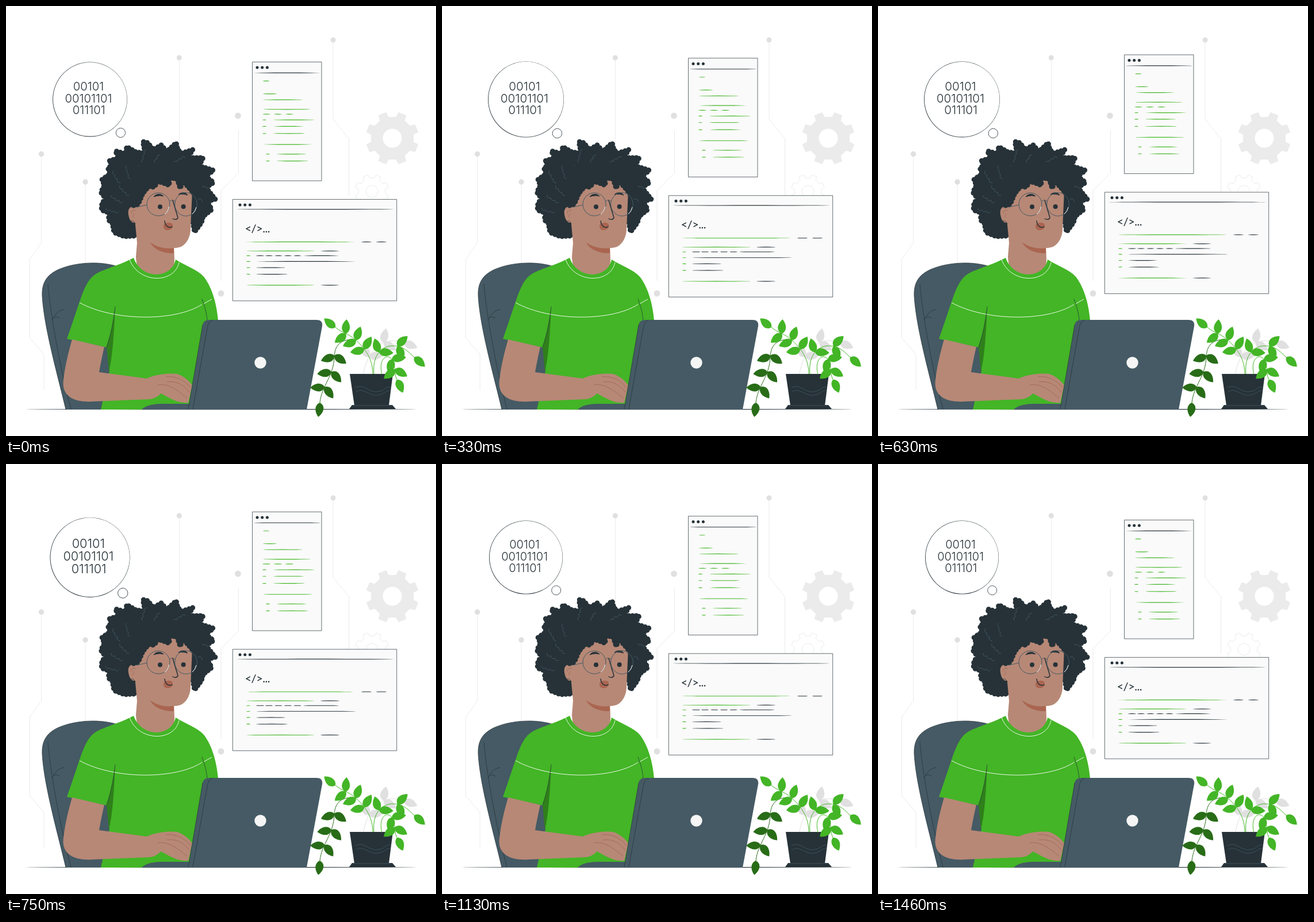
An HTML page for the animation above (1.5 s loop, 748 px wide and 748 px high).

```html
<!DOCTYPE html>
<html lang="en">
<head>
<meta charset="utf-8">
<title>Coding</title>
<style>
html, body { margin: 0; width: 100%; height: 100%; overflow: hidden; background: #fff; }
svg { display: block; width: 100%; height: 100%; }
.ink { fill: none; stroke: #263238; stroke-width: .7; stroke-linecap: round; stroke-linejoin: round; }
.crease { fill: none; stroke: #9d6451; stroke-width: .8; }
.wire { fill: none; stroke: #e6e6e6; stroke-width: .8; }
.dark { fill: #263238; }
.slate { fill: #455a64; }
.skin { fill: #b78876; }
.shade { fill: #aa6550; }
.green { fill: #43b526; }
.curly { fill: #263238; stroke: #263238; stroke-width: 9; stroke-linecap: round; stroke-dasharray: 0 6.5; }
.digits { font: 300 20px Inter, sans-serif; text-anchor: middle; }
.code { font: 500 20px Lato, sans-serif; letter-spacing: -.5px; }
</style>
</head>
<body>
<svg viewBox="0 0 748 748">
  <defs>
    <path id="wave" d="M-12 0q3 -6 8 -1q4 -5 8 0q4 -5 8 1"/>
    <g id="buttons" class="dark"><circle r="2.5"/><circle cx="8.7" r="2.5"/><circle cx="17.4" r="2.5"/></g>
  </defs>

  <!-- backdrop -->
  <path class="wire" d="M569 59V197L596.5 231V330M301.5 90V250M404.5 216V290L374 321V478M61.5 257V412L41 441V577L66 606V668M138 306V452"/>
  <g fill="#e0e0e0">
    <circle cx="569" cy="59" r="4.5"/>
    <circle cx="301.3" cy="90" r="4.5"/>
    <circle cx="403.5" cy="191" r="5.4"/>
    <circle cx="374" cy="500" r="5.4"/>
    <circle cx="61.5" cy="257.5" r="4.7"/>
    <circle cx="138" cy="306" r="4.7"/>
  </g>
  <path id="bigGear" fill="#ebebeb" fill-rule="evenodd"/>
  <path id="smallGear" class="wire"/>

  <!-- floating windows -->
  <g id="windows">
    <g fill="#fafafa" stroke="#263238" stroke-width=".7">
      <path d="M428.5 97.3H549V304H428.5Z"/>
      <path d="M394.3 336.3H679.7V512.8H394.3Z"/>
    </g>
    <use href="#buttons" x="437" y="107"/>
    <use href="#buttons" x="407" y="345.8"/>
    <text class="code dark" x="415.5" y="394">&lt;/&gt;...</text>
  </g>

  <!-- thought bubble -->
  <g id="bubble">
    <circle class="dark" cx="146" cy="162.5" r="64"/>
    <circle cx="146.2" cy="162.3" r="63.4" fill="#fff"/>
    <circle cx="198.7" cy="219.7" r="8" fill="#fff" stroke="#263238" stroke-width=".8"/>
    <g class="digits dark">
      <text x="143.6" y="147.3">00101</text>
      <text x="143.6" y="167.6">00101101</text>
      <text x="144.3" y="187.7">011101</text>
    </g>
  </g>

  <ellipse class="dark" cx="374" cy="701.6" rx="340" ry=".6"/>

  <!-- chair -->
  <path class="slate" d="M104 702C92 650 66 560 63 505C62 482 70 468 92 458C120 446 165 442 200 455L210 702Z"/>
  <path class="ink" d="M104 702C92 650 66 560 63 505C62 482 70 468 92 458C120 446 165 442 200 455M73 484C77 535 94 630 113 701M80 546C86 534 93 529 101 528M83 542q6 -3 10 1"/>

  <!-- hair behind the face -->
  <path class="curly" d="M222 400L206 401L188 394L185 378L178 372L180 360L166 355L167 342L174 336L165 324L171 312L167 302L181 292L177 281L190 276L178 270L196 264L190 252L208 257L210 245L226 254L242 256L238 236L247 238L256 250L270 242L280 253L296 238L299 250L306 256L325 250L316 264L343 264L336 278L361 286L347 296L361 307L348 316L364 336L350 340L358 354L343 366L340 377L328 393L318 340Z"/>
  <g id="waves" fill="none" stroke="#455a64" stroke-width=".8"></g>

  <!-- neck and face -->
  <path class="skin" d="M224 370L228 412L226 436C228 494 292 494 293 442L292 414L262 390Z"/>
  <path class="skin" d="M228 350C218 346 211 351 213 363C215 376 222 380 228 375C229 397 238 408 252 412C264 420 288 424 304 419C315 414 321 400 321 388L324 320L300 296H246L234 326Z"/>
  <path class="shade" d="M251 411C262 420 280 423 292 421V430C276 431 257 425 251 411Z"/>
  <path class="curly" d="M222 347L230 345L238 326L248 314L258 315L264 305L274 308L284 312L284 297L298 302L303 317L308 305L318 316L325 324L331 334L340 300L310 276H236L216 320Z"/>
  <path class="crease" d="M226 356q-7 -3 -8 5M224 361q-4 2 -3 7"/>
  <circle class="ink" cx="219" cy="379" r="5.3"/>
  <circle class="dark" cx="268" cy="349.3" r="4"/>
  <circle class="dark" cx="308.6" cy="349" r="4"/>
  <path class="dark" stroke="#263238" d="M257 332C261 326 270 326 274 331C268 329 262 330 257 332ZM300 328C305 323 313 324 316 329C311 327 305 327 300 328Z"/>
  <path class="shade" d="M276 378C272 383 274 389 280 390C286 390 291 387 290 380C286 374 279 378 276 378Z"/>
  <path class="ink" style="stroke-width:1.5" d="M290 338L299 368C298 372 293 372 290 370M276 374C277 382 282 387 289 384"/>
  <g fill="none" stroke="#455a64">
    <circle cx="265" cy="345" r="20"/>
    <ellipse cx="313" cy="345" rx="19.3" ry="20.3"/>
    <path d="M285 340Q289 335 294 340M245 346L227 350"/>
    <path stroke="#fff" d="M284 349Q282 358 276 362M331 350Q329 358 324 362"/>
  </g>

  <!-- shirt -->
  <path class="green" d="M222 438C198 451 168 458 155 467C136 480 131 508 106 579L176 594L180 635L165 702H330L369 547C366 515 358 490 345 472C333 458 312 452 295 441C288 475 236 477 222 438Z"/>
  <path fill="#2f7f1b" d="M190 523C187 548 183 570 175 593L179 636C186 608 188 565 190 523Z"/>
  <path fill="none" stroke="#fff" stroke-width=".9" d="M215 441C230 483 293 484 301 446M128 516C188 549 295 549 341 519M344 518L358 510"/>
  <path class="ink" d="M190 523C187 548 183 570 175 593M341 510C346 523 349 535 350 547"/>

  <!-- arm and hand -->
  <path class="skin" d="M115 580L171 593C167 610 164 625 162 637L245 648C258 641 283 638 298 640C312 645 320 654 324 660L317 690C300 692 284 682 270 674C263 680 258 683 250 684L150 688C116 690 96 677 100 650C103 624 109 601 115 580Z"/>
  <path class="crease" d="M278 645C298 643 311 652 321 664M280 654C298 652 309 659 319 672M264 659C284 656 300 670 315 682"/>

  <!-- laptop -->
  <path class="slate" d="M236 702C244 694 258 692 276 692H325V702Z"/>
  <path class="slate" d="M342 555C343 549 347 546 354 546H540C548 546 551 550 550 557L523 702H317Z"/>
  <path class="ink" d="M359 546.5C353 549 351 554 350 561L325 701M342 555L317 701"/>
  <circle cx="442.5" cy="620.5" r="10.2" fill="#f5f5f5"/>

  <!-- plant -->
  <g id="backPlant"></g>
  <path class="dark" d="M598 640H673L666 695H606Z"/>
  <path class="dark" d="M597 701L602 694H672L678 701Z"/>
  <path fill="none" stroke="#455a64" stroke-width=".8" d="M608 664C622 656 630 672 645 671S660 661 669 663M609 671C622 663 632 679 646 677S660 668 668 669M602 695H672"/>
  <g id="frontPlant"></g>
</svg>
<script>
const GREEN = '#43b526', DARK = '#263238';
const $ = id => document.getElementById(id);

function add(parent, tag, attrs) {
  const el = document.createElementNS('http://www.w3.org/2000/svg', tag);
  for (const name in attrs) el.setAttribute(name, attrs[name]);
  return parent.appendChild(el);
}

// Cog outline with eight tapered teeth and a round hole
function gear(id, cx, cy, outer, root, hole) {
  const pts = [];
  for (let i = 0; i < 8; i++) {
    for (const [r, off] of [[root, -13], [outer, -9], [outer, 9], [root, 13]]) {
      const a = (22.5 + i * 45 + off) * Math.PI / 180;
      pts.push(`${cx + r * Math.cos(a)} ${cy + r * Math.sin(a)}`);
    }
  }
  const arc = `a${hole} ${hole} 0 1 0 `;
  $(id).setAttribute('d', `M${pts.join('L')}ZM${cx - hole} ${cy}${arc}${2 * hole} 0${arc}${-2 * hole} 0Z`);
}
gear('bigGear', 672, 230, 46.5, 37.5, 16.5);
gear('smallGear', 636.5, 322.5, 29.5, 23.5, 10.5);

// Tapered stroke on a window
function dash(y, from, to, fill) {
  add($('windows'), 'ellipse', { cx: (from + to) / 2, cy: y, rx: (to - from) / 2, ry: .6, fill });
}

// Code row with a short gutter mark in front
function numbered(y, gutter, from, to, fill) {
  dash(y, gutter, gutter + 7, GREEN);
  dash(y, from, to, fill);
}

dash(116.3, 431, 547, DARK);
for (const [y, end] of [[130.3, 458], [152.7, 471], [163, 516], [179.7, 530], [240.8, 533]]) dash(y, 447, end, GREEN);
for (const [y, end] of [[198, 537], [209.3, 518], [221.7, 520]]) numbered(y, 446, 465, end, GREEN);
for (const [y, end] of [[257.5, 522], [269.5, 526]]) numbered(y, 452, 471, end, GREEN);
for (let x = 446; x < 500; x += 20) dash(188, x, x + 14, GREEN);

dash(353.5, 402, 674, DARK);
dash(410.3, 418, 606, GREEN);
for (const x of [618, 644]) dash(410.3, x, x + 18, DARK);
for (const y of [426, 485.5]) {
  dash(y, 418, 537, GREEN);
  dash(y, 547, 580, DARK);
}
for (const [y, end] of [[434.3, 449], [444.3, 609], [455, 486], [466.5, 490]]) numbered(y, 418, 435, end, DARK);
for (let x = 451; x < 510; x += 16.5) dash(434.3, x, x + 13, DARK);
dash(434.3, 517, 579, DARK);

// Curl lines fanned over the hair
for (let i = 0; i < 14; i++) {
  const deg = 165 + i * 15, a = deg * Math.PI / 180, r = 1 - i % 3 * .14;
  add($('waves'), 'use', {
    href: '#wave',
    transform: `translate(${262 + 80 * r * Math.cos(a)} ${335 + 76 * r * Math.sin(a)}) rotate(${deg + 30})`
  });
}

// Stem with pairs of leaves from one share of its length on, and one leaf at the tip
function branch(layer, color, d, pairs, first, spread = 55) {
  const stem = add($(layer), 'path', { d, fill: 'none', stroke: color });
  const length = stem.getTotalLength();
  for (let i = 0; i <= pairs; i++) {
    const at = length * (first + (1 - first) * i / pairs);
    const p = stem.getPointAtLength(at), q = stem.getPointAtLength(at - 2);
    const dir = Math.atan2(p.y - q.y, p.x - q.x) * 180 / Math.PI;
    for (const turn of i < pairs ? [-spread, spread] : [0]) {
      add($(layer), 'path', {
        d: 'M0 0C4 -10 15 -10 25 0C15 9 4 8 0 0Z', fill: color,
        transform: `translate(${p.x} ${p.y}) rotate(${dir + turn})`
      });
    }
  }
}
branch('backPlant', '#e0e0e0', 'M622 640C628 600 655 572 692 586', 2, .3);
branch('frontPlant', '#286c17', 'M604 580C580 580 572 592 571 610C570 645 549 660 546 690', 3, .36, 62);
branch('frontPlant', GREEN, 'M638 640C638 615 626 596 606 579C595 570 584 568 573 559', 3, .42, 66);
branch('frontPlant', GREEN, 'M640 640C636 600 662 584 688 594C698 598 704 606 710 611', 2, .36);
branch('frontPlant', GREEN, 'M654 641C646 610 668 600 675 622C677 634 676 642 680 650', 2, .55);

// Heartbeat stops: [progress, scale]
const beat = [[0, 1], [.1, 1.1], [.3, 1], [.4, 1], [.5, 1.1], [.6, 1], [1, 1]];

function pulse(p) {
  const i = beat.findIndex(stop => stop[0] > p);
  const [p0, s0] = beat[i - 1], [p1, s1] = beat[i];
  return s0 + (s1 - s0) * (p - p0) / (p1 - p0);
}

// 36 steps per loop, 24 per second, on a 10 ms clock
function draw(now) {
  const tick = Math.floor(now % 1500 / 10);
  const step = Math.ceil((tick + .5) * 24 / 100) - 1;
  const p = (step + .5) / 36;
  const lift = 14.96 * (1 - Math.abs(1 - 2 * p));
  $('windows').setAttribute('transform', `translate(0 ${.5 - lift})`);
  $('bubble').setAttribute('transform', `translate(146 163.2) scale(${pulse(p)}) translate(-146 -163.2)`);
}

const start = performance.now();
function loop() {
  draw(performance.now() - start);
  requestAnimationFrame(loop);
}
loop();
</script>
</body>
</html>
```
